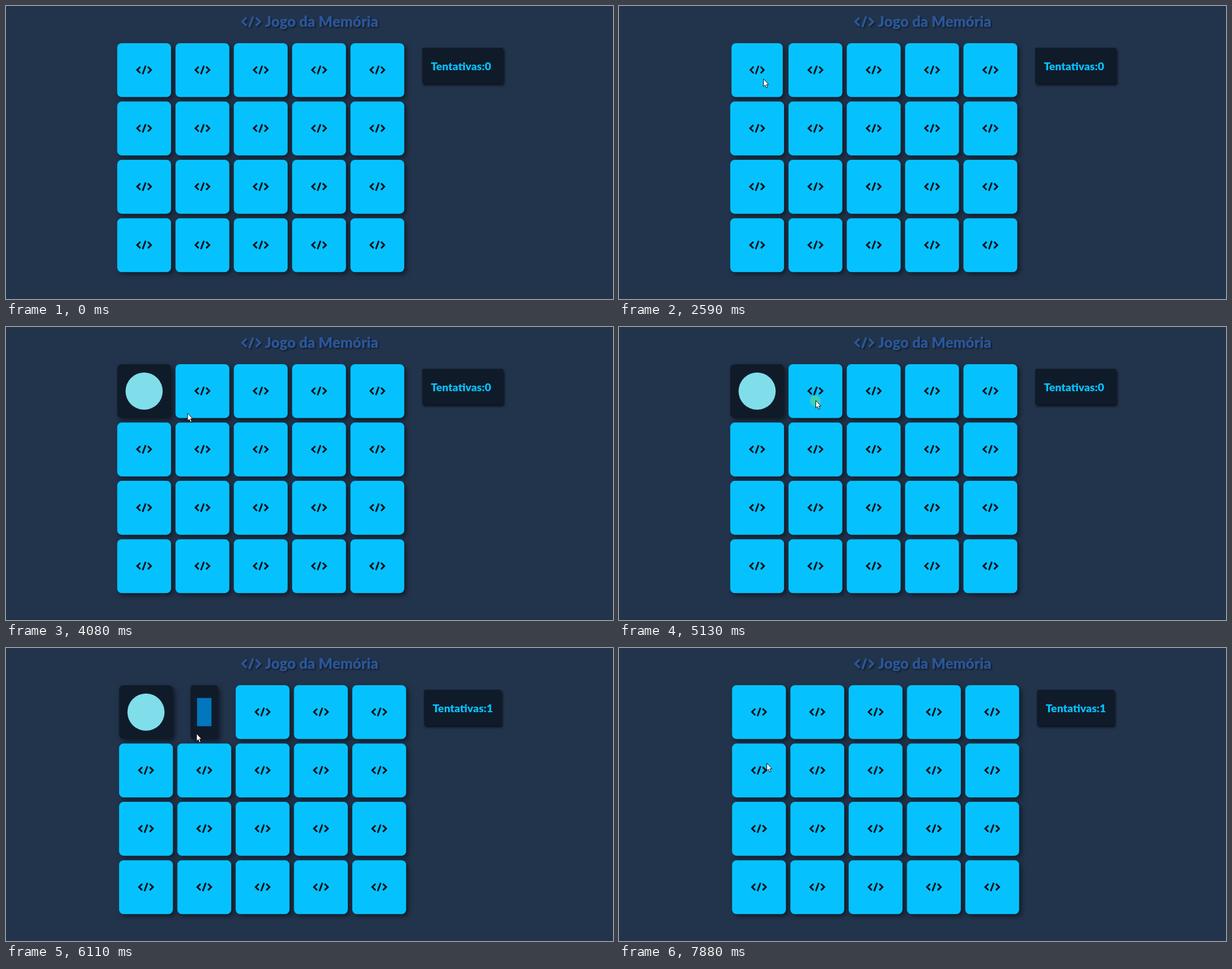
Write an HTML page with a canvas that moves like this. It is 1078 px wide and 520 px high and loops after 8000 ms.

```html
<!DOCTYPE html>
<html lang="pt">
<head>
<meta charset="utf-8">
<title>Jogo da Memória</title>
<style>
  html, body { margin: 0; width: 100%; height: 100%; overflow: hidden; background: #22344c; }
  canvas { display: block; }
</style>
</head>
<body>
<canvas id="stage" width="1078" height="520"></canvas>
<script>
const ctx = document.getElementById('stage').getContext('2d');
const LOOP = 8000;
const BLUE = '#05c2ff', DARK = '#101b2a', BACKGROUND = '#22344c', TITLE = '#2a5699';
const COLUMNS = 5, ROWS = 4, CARD = 95.6, PITCH = 103.55;
const FLIP_TIME = 400, FLIP_BACK = 7204, SCORE_CHANGE = 6035;
const CLICK = 5060, CLICK_TIME = 200;

// Pointer tip; a power above 1 speeds up along the way, below 1 slows down
const entry = { x: 1019, y: 495 };
const moves = [
  { start: 170, end: 910, x: 620, y: 276 },
  { start: 910, end: 1390, x: 312, y: 65 },
  { start: 1390, end: 1920, x: 256, y: 129 },
  { start: 2590, end: 3140, x: 307, y: 165, power: 2 },
  { start: 3540, end: CLICK, x: 349, y: 130 },
  { start: 5970, end: 6740, x: 323, y: 180, power: .5 },
  { start: 7270, end: 7880, x: 262, y: 204 }
];

const opened = [
  { start: 2550, draw: () => fillShape('#80deea', () => ctx.arc(0, 0, 33, 0, 7)) },
  { start: 5954, draw: () => fillShape('#0277bd', () => ctx.rect(-25, -25, 50, 50)) }
];

const clamp = k => Math.min(1, Math.max(0, k));

function pointerTip(t) {
  let { x, y } = entry;
  for (const move of moves) {
    const k = clamp((t - move.start) / (move.end - move.start)) ** (move.power || 1);
    x += (move.x - x) * k;
    y += (move.y - y) * k;
  }
  return { x, y };
}

// The CSS "ease" curve, cubic-bezier(.25, .1, .25, 1)
function ease(x) {
  const bezier = (s, a, b) => 3 * (1 - s) ** 2 * s * a + 3 * (1 - s) * s * s * b + s ** 3;
  let low = 0, high = 1;
  for (let i = 0; i < 20; i++) {
    const mid = (low + high) / 2;
    if (bezier(mid, .25, .25) < x) low = mid; else high = mid;
  }
  return bezier(low, .1, 1);
}

const turned = (t, start) => ease(clamp((t - start) / FLIP_TIME));

function withShadow(x, y, blur, alpha, paint) {
  ctx.save();
  ctx.shadowColor = `rgba(0,0,0,${alpha})`;
  ctx.shadowOffsetX = x;
  ctx.shadowOffsetY = y;
  ctx.shadowBlur = blur;
  paint();
  ctx.restore();
}

function fillShape(color, build) {
  ctx.fillStyle = color;
  ctx.beginPath();
  build();
  ctx.fill();
}

function codeIcon(x, y, scale, color) {
  ctx.save();
  ctx.translate(x, y);
  ctx.scale(scale, scale);
  ctx.strokeStyle = color;
  ctx.lineWidth = 3;
  ctx.beginPath();
  for (const side of [-1, 1]) {
    ctx.moveTo(side * 6.6, -5.7);
    ctx.lineTo(side * 12.4, 0);
    ctx.lineTo(side * 6.6, 5.7);
  }
  ctx.moveTo(-2.7, 7.4);
  ctx.lineTo(2.7, -7.4);
  ctx.stroke();
  ctx.restore();
}

function card(x, y, progress, drawFace) {
  const width = Math.cos(progress * Math.PI), open = width < 0;
  ctx.save();
  ctx.translate(x + CARD / 2, y + CARD / 2);
  ctx.scale(Math.max(Math.abs(width), .01), 1);
  withShadow(4, 4, 8, .5, () => fillShape(open ? DARK : BLUE, () =>
    ctx.roundRect(-CARD / 2, -CARD / 2, CARD, CARD, 8)));
  if (open) drawFace(); else codeIcon(0, -.3, 1, '#06101a');
  ctx.restore();
}

function board(t, left) {
  for (let i = 0; i < COLUMNS * ROWS; i++) {
    const flip = opened[i];
    const progress = flip ? turned(t, flip.start) - turned(t, FLIP_BACK) : 0;
    card(left + i % COLUMNS * PITCH, 66 + Math.floor(i / COLUMNS) * PITCH, progress, flip?.draw);
  }
}

function text(value, x, y, size, color) {
  ctx.font = `900 ${size}px Lato, sans-serif`;
  ctx.fillStyle = color;
  ctx.fillText(value, x, y);
}

function heading() {
  withShadow(2, 2, 3, .45, () => {
    codeIcon(435.5, 28, 1.27, TITLE);
    text('Jogo da Memória', 460, 37, 26, TITLE);
  });
}

function scoreBox(score, left, width) {
  withShadow(2, 3, 4, .7, () => fillShape(DARK, () => ctx.roundRect(left, 74, width, 63.7, 3)));
  text('Tentativas:' + score, left + 15.5, 113.5, 19.5, BLUE);
}

function pointer({ x, y }) {
  ctx.save();
  ctx.translate(x + .5, y + .5);
  ctx.strokeStyle = '#111';
  fillShape('#fff', () => ctx.lineTo(0, 0));
  const arrow = new Path2D('M0 0V13.5L3 10.7 5 15.5 7.5 14.5 5.3 9.8H9.3Z');
  ctx.fill(arrow);
  ctx.stroke(arrow);
  ctx.restore();
}

function draw(t) {
  const score = t < SCORE_CHANGE ? 0 : 1;
  // The narrower "1" shrinks the score box, so the centred row shifts right
  const shift = score * 3.3;
  ctx.fillStyle = BACKGROUND;
  ctx.fillRect(0, 0, 1078, 520);
  heading();
  scoreBox(score, 739 + shift, 144 - 2 * shift);
  board(t, 197.5 + shift);

  if (t < moves[0].start) return;
  const tip = pointerTip(t);
  if (t >= CLICK && t < CLICK + CLICK_TIME)
    fillShape('#43cfb5', () => ctx.arc(tip.x - .3, tip.y + .8, 9.6, 0, 7));
  pointer(tip);
}

function tick() {
  draw(performance.now() % LOOP);
  requestAnimationFrame(tick);
}
tick();
</script>
</body>
</html>
```
